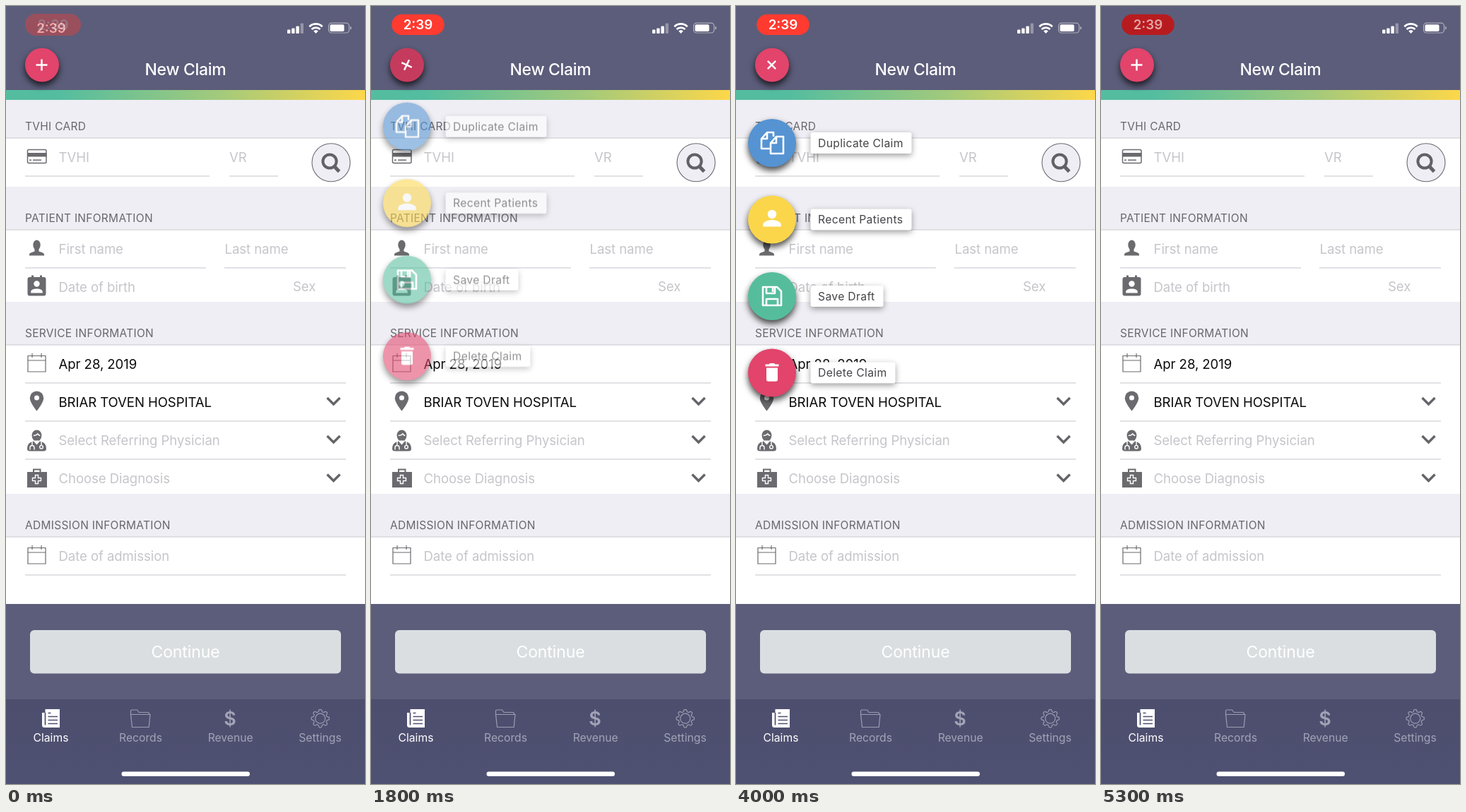
Write an HTML page that moves like this. It is 508 px wide and 1102 px high and loops after 5.4 s.

```html
<!DOCTYPE html>
<html lang="en">
<head>
<meta charset="utf-8">
<title>New Claim</title>
<style>
  html, body { margin: 0; width: 100%; height: 100%; overflow: hidden; background: #5c5d7a; }
  svg { display: block; position: absolute; left: 0; top: 0; }
  text { font-family: Inter, Roboto, sans-serif; }
  .head { font-size: 15.5px; letter-spacing: .28px; fill: #68676d; }
  .field { font-size: 18.6px; letter-spacing: -.08px; fill: #c6c5ca; }
  .value { fill: #0b0b0c; }
  .tab { font-size: 15.7px; text-anchor: middle; fill: #a2a3b6; }
  .active { fill: #fff; }
  .title { font-size: 23px; font-weight: 500; letter-spacing: -.3px; text-anchor: middle; fill: #fff; }
  .button { font-size: 23px; letter-spacing: -.1px; text-anchor: middle; fill: #fff; }
  .clock { font-size: 18.8px; font-weight: 600; text-anchor: middle; fill: #fff; }
  .label { font-size: 15.7px; letter-spacing: .33px; fill: #444347; }
  .line { fill: none; stroke: #fff; stroke-width: 2.6; stroke-linejoin: round; }
  .round { filter: drop-shadow(0 5px 5px rgba(0,0,0,.72)); }
  .card { fill: #fff; filter: drop-shadow(0 3px 4px rgba(0,0,0,.38)); }
</style>
</head>
<body>
<svg id="stage" width="508" height="1102" viewBox="0 0 508 1102">
  <defs>
    <linearGradient id="rainbow">
      <stop offset=".15" stop-color="#54bd9f"/>
      <stop offset=".6" stop-color="#a4ca7b"/>
      <stop offset="1" stop-color="#fdd749"/>
    </linearGradient>
    <linearGradient id="tabs" x2="0" y2="1">
      <stop stop-color="#4d4e6e"/>
      <stop offset="1" stop-color="#4f5172"/>
    </linearGradient>
    <g id="calendar" fill="none" stroke="#6b6a6f" stroke-width="1.2">
      <path d="M31 495.5H56V518H31ZM31 502H56M37 492v6M50 492v6"/>
    </g>
    <path id="chevron" d="M454.5 555L463.5 564L472.5 555" fill="none" stroke="#656469" stroke-width="3.4"/>
  </defs>

  <rect width="508" height="1102" fill="#5c5d7a"/>
  <rect y="119" width="508" height="14" fill="url(#rainbow)"/>
  <rect y="133" width="508" height="714" fill="#efeef4"/>
  <g id="panels"></g>
  <rect y="982" width="508" height="120" fill="url(#tabs)"/>
  <rect x="34" y="884" width="440" height="61.5" rx="6" fill="#dadee1"/>
  <rect x="163.5" y="1084.5" width="181.5" height="6.5" rx="3.25" fill="#fff"/>

  <!-- status bar -->
  <g fill="#fff">
    <rect x="398" y="33.5" width="4.4" height="5.5" rx="1"/>
    <rect x="404.2" y="31.5" width="4.4" height="7.5" rx="1"/>
    <rect x="410.4" y="28.5" width="4.4" height="10.5" rx="1"/>
    <rect x="416.6" y="24.5" width="4.4" height="14.5" rx="1" opacity=".35"/>
    <path d="M438.500 39l-3.300-3.400a4.800 4.800 0 0 1 6.600 0z"/>
    <rect x="458.500" y="26.200" width="20" height="9.800" rx="1.800"/>
    <path d="M487 28.500q2 1 2 2.600t-2 2.600z" opacity=".5"/>
  </g>
  <g fill="none" stroke="#fff">
    <path d="M432.500 33a8.600 8.600 0 0 1 12 0M429.300 29.200a13.200 13.200 0 0 1 18.400 0" stroke-width="2.700"/>
    <rect x="456.500" y="24.200" width="29" height="13.800" rx="4" stroke-width="1.200" opacity=".5"/>
  </g>

  <!-- form icons -->
  <g fill="#6b6a6f">
    <path d="M30 208h27.500v5.500H30z"/>
    <rect x="30.500" y="203.500" width="26.500" height="19" rx="2" fill="none" stroke="#6b6a6f" stroke-width="1.500"/>
    <path d="M33 218.200h3M38 218.200h12" stroke="#6b6a6f" stroke-width="1.500"/>
    <ellipse cx="43.500" cy="338.500" rx="5.200" ry="7"/>
    <path d="M40.500 343h6v4.500l6 2.300q1.700.8 1.700 3.700H32.800q0-2.900 1.700-3.700l6-2.300z"/>
    <path d="M33.500 384h2.500v-2.500h3V384h9v-2.500h3V384h2.500q3 0 3 3v20.500q0 3-3 3h-20q-3 0-3-3V387q0-3 3-3z"/>
    <path d="M43.500 545.500a9.700 9.700 0 0 1 9.700 9.700c0 7-9.700 18.300-9.700 18.300s-9.700-11.300-9.700-18.300a9.700 9.700 0 0 1 9.700-9.700z"/>
    <path d="M36.500 608a7 7.500 0 0 1 14 0q0 4-3 7.500h-8q-3-3.500-3-7.500z"/>
    <path d="M39 616.500l4.500 5 4.500-5q9 1.500 9 10.500 0 3.500-4 3.500H34q-4 0-4-3.500 0-9 9-10.500z"/>
    <path d="M30 660h8v-4.500h11.500v4.500H58v22H30zM40 660h7.500v-2.600H40z" fill-rule="evenodd"/>
  </g>
  <g fill="#fff">
    <circle cx="43.500" cy="393.500" r="4.200"/>
    <path d="M35.200 406.500v-1.500q0-4.500 8.300-4.500t8.300 4.500v1.500z"/>
    <circle cx="43.500" cy="555" r="3.500"/>
  </g>
  <g fill="none" stroke="#fff" stroke-width="1.400">
    <path d="M38.800 608.500q4 0 6-2.500 1.500 2.300 3.600 2.500"/>
    <path d="M37 617v5.500M34 628.500v-3a3 3 0 0 1 6 0v3M50 617v5"/>
    <circle cx="50" cy="624.700" r="2.300"/>
    <path d="M41.500 664.500h4v4h4v4h-4v4h-4v-4h-4v-4h4z"/>
  </g>
  <use href="#calendar"/>
  <use href="#calendar" y="272"/>
  <use href="#chevron"/>
  <use href="#chevron" y="54"/>
  <use href="#chevron" y="108.500"/>
  <circle cx="460" cy="221.700" r="27" fill="#efeef4" stroke="#6b6a70" stroke-width="1.100"/>
  <path d="M464.500 227L471.500 234.500" stroke="#626166" stroke-width="5"/>
  <circle cx="458" cy="220" r="9.600" fill="none" stroke="#626166" stroke-width="4"/>

  <!-- tab icons -->
  <path d="M55.500 996H76v26H54.500q-3.500 0-3.500-3.500V1001h4.500z" fill="#fff"/>
  <path d="M55.500 1001v17.500M59.500 1001.500h4M59.500 1006.500H73M59.500 1011.500H73M59.500 1016.500H73" stroke="#4d4e6e" stroke-width="1.700"/>
  <g fill="none" stroke="#9b9cb0" stroke-width="1.200">
    <path d="M178.500 1021.500L176.500 1003V999q0-2 2-2h7l2.500 3.500h12.500q2 0 2 2v1M176.500 1003.500H204l-1.800 18h-23.700z"/>
    <path id="gear"/>
    <circle cx="444.700" cy="1009.200" r="7"/>
  </g>
  <text x="317" y="1019" font-size="27" font-weight="600" text-anchor="middle" fill="#a2a3b6">$</text>

  <g id="words"></g>

  <!-- clock and recording pill -->
  <text id="clock" class="clock" x="64" y="37.800">2:39</text>
  <g id="pill">
    <rect id="pillBox" x="-37.200" y="-14.600" width="74.400" height="29.200" rx="14.600"/>
    <text id="pillText" class="clock" y="6.800">2:39</text>
  </g>

  <!-- floating menu -->
  <g id="menu"></g>
  <g transform="translate(51 83.500)">
    <circle class="round" r="24" fill="#e2446b"/>
    <circle id="press" r="24"/>
    <path id="plus" d="M-8 0H8M0-8V8" stroke="#fff" stroke-width="2.500"/>
  </g>
</svg>

<script>
const LOOP = 5400, STEP = 100;
const $ = id => document.getElementById(id);
const set = (el, attrs) => { for (const k in attrs) el.setAttribute(k, attrs[k]); };
const clamp = x => Math.min(1, Math.max(0, x));
const smooth = x => { x = clamp(x); return x * x * (3 - 2 * x); };
const mix = (a, b, p) => a + (b - a) * p;

// Linear interpolation through [time, value] pairs.
function track(points, t) {
  let [t0, v0] = points[0];
  for (const [t1, v1] of points) {
    if (t < t1) return t1 === t0 ? v1 : mix(v0, v1, clamp((t - t0) / (t1 - t0)));
    [t0, v0] = [t1, v1];
  }
  return v0;
}

const panels = [[187, 256], [317, 419], [480, 691], [752, 847]];
const rules = [[27, 288, 241], [316, 385, 241], [27, 283, 371], [309, 481, 371],
  [27, 481, 534], [27, 481, 588], [27, 481, 642], [27, 481, 806]];
$('panels').innerHTML =
  panels.map(([a, b]) => `<rect y="${a}" width="508" height="${b - a}" fill="#fff"/>
    <rect y="${a - 1}" width="508" height="1.8" fill="#dddce1"/>`).join('') +
  rules.map(([a, b, y]) => `<rect x="${a}" y="${y - 1}" width="${b - a}" height="1.8" fill="#dfdee2"/>`).join('');

const words = [
  ['title', 254, 97.5, 'New Claim'],
  ['head', 27, 176, 'TVHI CARD'],
  ['field', 74.5, 221, 'TVHI'],
  ['field', 316, 221, 'VR'],
  ['head', 27, 305.5, 'PATIENT INFORMATION'],
  ['field', 74.5, 350.5, 'First name'],
  ['field', 309.5, 350.5, 'Last name'],
  ['field', 74.5, 404.5, 'Date of birth'],
  ['field', 406, 403.5, 'Sex'],
  ['head', 27, 469, 'SERVICE INFORMATION'],
  ['field value', 74.5, 513.5, 'Apr 28, 2019'],
  ['field value', 74.5, 567.5, 'BRIAR TOVEN HOSPITAL'],
  ['field', 74.5, 622, 'Select Referring Physician'],
  ['field', 74.5, 676, 'Choose Diagnosis'],
  ['head', 27, 741, 'ADMISSION INFORMATION'],
  ['field', 74.5, 785.5, 'Date of admission'],
  ['button', 254, 923, 'Continue'],
  ['tab active', 63.5, 1042, 'Claims'],
  ['tab', 190.5, 1042, 'Records'],
  ['tab', 317.7, 1042, 'Revenue'],
  ['tab', 444.5, 1042, 'Settings']
];
$('words').innerHTML = words.map(([cls, x, y, s]) =>
  `<text class="${cls}" x="${x}" y="${y}">${s}</text>`).join('');

const items = [
  ['Duplicate Claim', '#5593d2', 143,
    '<path class="line" d="M-2 8H-15V-6L-7-15H2V-9M-7-15V-6H-15M-2 0L6-9H16V15H-2ZM6-9V0H-2"/>'],
  ['Recent Patients', '#fbd64b', 143,
    '<circle cy="-7.5" r="6.2" fill="#fff"/><path d="M-12.7 10V7C-12.7 3-5 .5 0 .5S12.7 3 12.7 7V10Z" fill="#fff"/>'],
  ['Save Draft', '#55bd9c', 103,
    '<path class="line" d="M-13-13H7L13-7V13H-13ZM-8-13V-4H4V-13M-8 13V4H8V13M1-12V-6"/>'],
  ['Delete Claim', '#e2446b', 120,
    '<path d="M-9.500-12H-4.500L-3-13.500H3L4.500-12H9.500V-9H-9.500ZM-8-7H8V9.500Q8 12.300 5.200 12.300H-5.200Q-8 12.300-8 9.500Z" fill="#fff"/>']
];
$('menu').innerHTML = items.map(([name, color, width, icon], i) =>
  `<g transform="translate(51 ${194 + i * 108.5})">
    <circle class="round" r="34" fill="${color}"/>${icon}
    <rect class="card" x="54.5" y="-15" width="${width}" height="30" rx="3"/>
    <text class="label" x="65" y="5.500">${name}</text>
  </g>`).join('');

// Gear outline: a circle with eight soft teeth.
const gear = Array.from({ length: 96 }, (_, i) => {
  const a = i / 96 * 2 * Math.PI;
  const r = 11.2 + 1.5 * Math.tanh(2.5 * Math.cos(8 * a));
  return (444.7 + r * Math.cos(a)).toFixed(2) + ' ' + (1009.2 + r * Math.sin(a)).toFixed(2);
});
set($('gear'), { d: 'M' + gear.join('L') + 'Z' });

const pressTrack = [[1400, 0], [1600, .13], [1800, .13], [2100, 0],
  [4300, 0], [4500, .1], [4700, .09], [5000, 0]];

function draw(t) {
  const open = smooth((t - 1580) / 400) - smooth((t - 4480) / 400);
  set($('menu'), { opacity: open, transform: `translate(0 ${-55 * (1 - open)})` });
  set($('plus'), { transform: `translate(-.5 0) rotate(${45 * open})` });
  set($('press'), { opacity: track(pressTrack, t) });

  const shown = track([[0, .38], [300, 1]], t);
  const tap = track([[5100, 0], [5300, 1]], t);
  const glow = smooth(.5 + .75 * Math.cos((t - 1880) / 2100 * 2 * Math.PI));
  const rgb = [[214, 255, 184], [48, 59, 27], [46, 48, 31]]
    .map(([dim, lit, down]) => Math.round(mix(mix(dim, lit, glow), down, tap)));
  set($('clock'), { opacity: track([[0, .85], [300, 0]], t) });
  set($('pill'), { opacity: shown, transform: `translate(66.500 26.400) scale(${mix(1.1, 1, shown)})` });
  set($('pillBox'), { fill: `rgb(${rgb})` });
  set($('pillText'), { opacity: mix(1, .6, tap) * track([[0, .5], [300, 1]], t) });
}

function frame() {
  const t = performance.now() % LOOP;
  draw(Math.floor(t / STEP) * STEP);
  requestAnimationFrame(frame);
}
frame();
</script>
</body>
</html>
```
